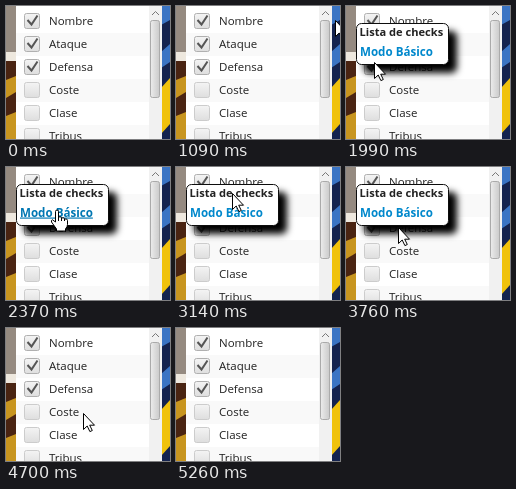
These frames come from a looping animation (164x133 px, 6.66 s). An HTML page:

```html
<!DOCTYPE html>
<html lang="es">
<head>
<meta charset="utf-8">
<style>
html, body { margin: 0; width: 100%; height: 100%; overflow: hidden; }
svg { display: block; font-family: "Open Sans", "Noto Sans", sans-serif; }
</style>
</head>
<body>
<svg width="164" height="133" viewBox="0 0 164 133">
  <defs>
    <linearGradient id="boxFill" x2="0" y2="1">
      <stop stop-color="#f4f4f4"/><stop offset="1" stop-color="#dedede"/>
    </linearGradient>
    <linearGradient id="thumbFill">
      <stop stop-color="#ececec"/><stop offset="1" stop-color="#cacaca"/>
    </linearGradient>
    <filter id="shadow" x="-10%" y="-10%" width="140%" height="160%">
      <feDropShadow dx="8" dy="8" stdDeviation="3.6" flood-color="#000"/>
    </filter>
  </defs>

  <!-- artwork visible on both sides of the panel -->
  <rect width="10" height="133" fill="#958a80"/>
  <path d="M0 46h10v9H0z" fill="#eee8de"/>
  <path d="M0 55h10v78H0z" fill="#4a2412"/>
  <path d="M0 74l10-4v16L0 92zM0 110l10-4v27H0z" fill="#c8951f"/>
  <rect x="155" width="9" height="133" fill="#14234f"/>
  <path d="M155 0h9v14l-9 5zM155 46l9-8v18l-9 6z" fill="#3a74c4"/>
  <path d="M155 82l9-10v46l-9 10z" fill="#f0c20c"/>

  <rect x="10" width="146" height="133" fill="#fff"/>
  <g id="rows"></g>

  <rect x="143" width="13" height="133" fill="#f1f1f1"/>
  <path d="M146 9l3.5-3.5L153 9" fill="none" stroke="#777"/>
  <rect x="144.5" y="14.5" width="9" height="77" rx="2" fill="url(#thumbFill)" stroke="#aaa"/>

  <g id="popup" font-weight="700">
    <rect x="10.5" y="17.5" width="92" height="41" rx="5" fill="#fff" stroke="#111" filter="url(#shadow)"/>
    <text x="13.5" y="29.5" font-size="11.1" fill="#222">Lista de checks</text>
    <text id="link" x="14" y="49.5" font-size="11.6">Modo Básico</text>
  </g>

  <g id="cursor" fill="#fff" stroke="#000" stroke-linejoin="round">
    <path id="arrow" d="M-.5.5v16l3.700-3.500 2.700 5.600 2.400-1.100-2.600-5.300h4.800z"/>
    <g id="hand">
      <path d="M-1.500 12V1.500q0-1.500 1.500-1.500t1.500 1.500V7q3-1 3 1 3-1 3 1 3-.7 3 1.500v4q0 2-2 4.500v2h-9v-2l-5-7q-.5-2 1-2.200z"/>
      <path d="M1.500 7v4M4.500 8v3M7.500 9v2" fill="none"/>
    </g>
  </g>
</svg>
<script>
const LOOP = 6660;
const byId = id => document.getElementById(id);
const show = (id, visible) => byId(id).setAttribute("visibility", visible ? "visible" : "hidden");

const labels = ["Nombre", "Ataque", "Defensa", "Coste", "Clase", "Tribus"];
byId("rows").innerHTML = labels.map((label, i) => {
  const checked = i < 3;
  return `<g transform="translate(0 ${i * 23})">
    <rect x="10" y="4" width="133" height="23" fill="${i % 2 ? "#f9f9f9" : "#fff"}"/>
    <rect x="18.5" y="7.5" width="15" height="15" rx="2" fill="url(#boxFill)" stroke="${checked ? "#b0b0b0" : "#ccc"}"/>
    ${checked ? '<path d="M21.500 14l4 4.500 6-9" fill="none" stroke="#555" stroke-width="2"/>' : ""}
    <text x="43" y="19" font-size="11.5" fill="#222">${label}</text>
  </g>`;
}).join("");

const easeIn = k => k ** 1.3;
const easeOut = k => 1 - (1 - k) ** 2.2;
const smooth = k => k * k * (3 - 2 * k);

// Pointer moves; it rests between them
const entry = { x: 160, y: 14 };
const moves = [
  { start: 1090, end: 1730, x: 75, y: 75, ease: easeOut },
  { start: 1760, end: 2080, x: 18, y: 52, ease: smooth },
  { start: 2080, end: 2400, x: 52, y: 43, ease: smooth },
  { start: 2430, end: 2830, x: 57, y: 26, ease: smooth },
  { start: 3140, end: 4070, x: 51, y: 84, ease: easeIn },
  { start: 4420, end: 5260, x: 164, y: 88, ease: easeIn }
];

function pointerAt(t) {
  if (t <= moves[0].start || t >= moves.at(-1).end) return null;
  let { x, y } = entry;
  for (const move of moves) {
    if (t < move.start) break;
    const k = move.ease(Math.min(1, (t - move.start) / (move.end - move.start)));
    x += (move.x - x) * k;
    y += (move.y - y) * k;
  }
  return { x: Math.round(x), y: Math.round(y) };
}

function draw(now) {
  const t = now % LOOP;
  const pointer = pointerAt(t);
  const open = t >= 1290 && t < 3920;
  const hover = open && pointer && pointer.x < 88 && pointer.y >= 37 && pointer.y <= 53;

  show("popup", open);
  byId("link").setAttribute("fill", hover ? "#0077b3" : "#0088cc");
  byId("link").setAttribute("text-decoration", hover ? "underline" : "none");
  show("arrow", pointer && !hover);
  show("hand", hover);
  if (pointer) byId("cursor").setAttribute("transform", `translate(${pointer.x} ${pointer.y})`);
  requestAnimationFrame(draw);
}
draw(performance.now());
</script>
</body>
</html>
```
